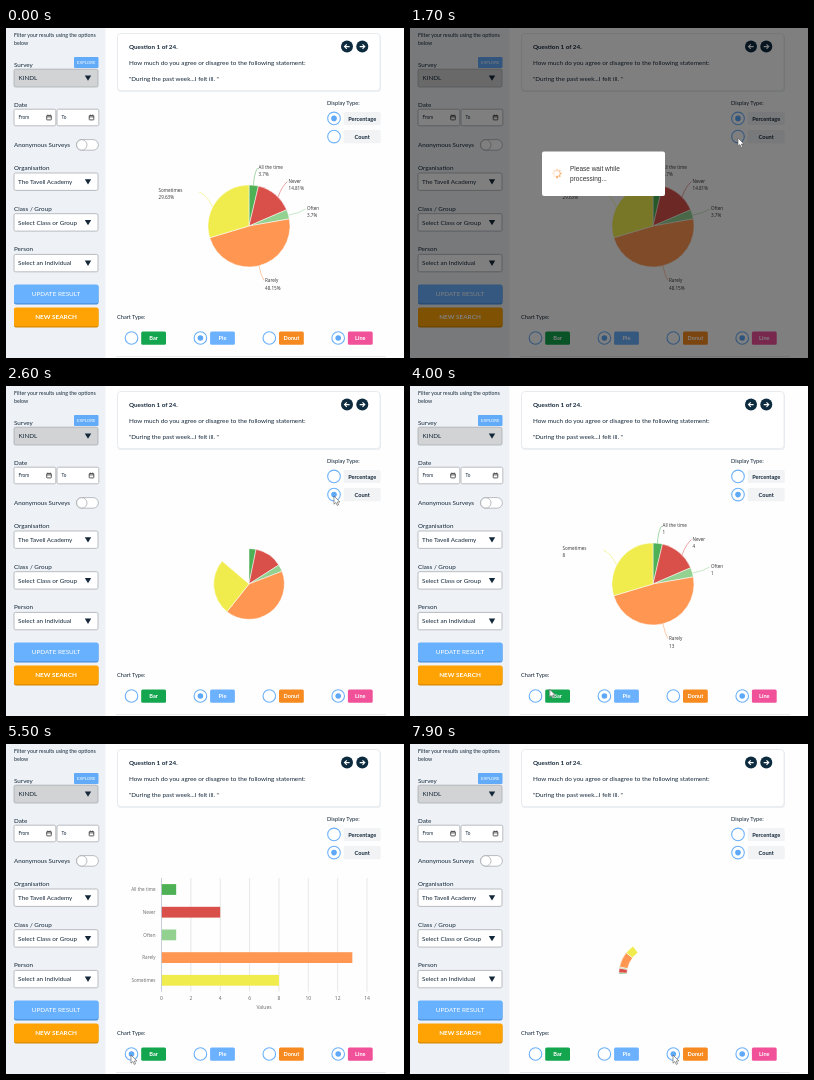
Animation of 398 by 330 pixels, one loop 8 s. Source, as an HTML page:

```html
<!DOCTYPE html>
<html lang="en">
<head>
<meta charset="utf-8">
<title>Survey results</title>
<style>
html, body { margin: 0; width: 100%; height: 100%; overflow: hidden; background: #fefefe; }
svg { display: block; width: 398px; height: 330px; font: 6.3px Lato, sans-serif; fill: #15283a; }
.b { font-weight: 700; }
.mid { text-anchor: middle; }
.end { text-anchor: end; }
.s { font-size: 5.65px; }
.white { fill: #fff; }
.field { fill: #fff; stroke: #a9adb2; stroke-width: .8; }
.ring { fill: #fff; stroke: #6bb0fa; stroke-width: 1.1; }
.dot { fill: #5fa8f8; }
.chart { font: 4.6px "Open Sans", sans-serif; fill: #333; }
.axis { fill: #666; }
.link { fill: none; stroke-width: .5; }
.grid { stroke: #d9d9d9; stroke-width: .6; }
#arcs { stroke: #fff; stroke-width: .5; }
.step { animation: 8s step-end infinite; }
#percent, #dotPercent { animation-name: first; }
#dotCount { animation-name: counted; }
#count { animation: countLabels 8s linear infinite; }
#bars, #dotBar { animation-name: bar; }
#dotPie { animation-name: pie; }
#dotDonut { animation-name: donut; }
#modal { animation-name: modal; }
#grow { transform-origin: 155.5px 0; animation: grow 8s linear infinite; }
#spin { animation: spin 1s steps(8) infinite; }
#cursor { animation: move 8s ease-in-out infinite; }
@keyframes first { 0% { opacity: 1 } 23.04%, 100% { opacity: 0 } }
@keyframes counted { 0% { opacity: 0 } 23.04%, 100% { opacity: 1 } }
@keyframes countLabels { 0%, 35.5% { opacity: 0 } 38%, 56.24% { opacity: 1 } 56.25%, 100% { opacity: 0 } }
@keyframes bar { 0% { opacity: 0 } 56.25% { opacity: 1 } 93.75%, 100% { opacity: 0 } }
@keyframes pie { 0% { opacity: 1 } 56.25%, 100% { opacity: 0 } }
@keyframes donut { 0% { opacity: 0 } 93.75%, 100% { opacity: 1 } }
@keyframes modal { 0% { opacity: 0 } 20.6% { opacity: 1 } 26.25%, 100% { opacity: 0 } }
@keyframes grow {
  0%, 56.25% { transform: scaleX(0); animation-timing-function: cubic-bezier(.37, 0, .63, 1) }
  68.75%, 100% { transform: none }
}
@keyframes spin { to { transform: rotate(360deg) } }
@keyframes move {
  0%, 6.24% { transform: translate(368px, 180px); opacity: 0 }
  6.25% { transform: translate(368px, 180px); opacity: 1 }
  11.25% { transform: translate(343px, 120px) }
  17.5%, 42.5% { transform: translate(328px, 110px) }
  50% { transform: translate(139.5px, 303px) }
  55%, 81.25% { transform: translate(125px, 311px) }
  90%, 100% { transform: translate(263px, 311px); opacity: 1 }
}
</style>
</head>
<body>
<svg viewBox="0 0 398 330">
  <defs>
    <path id="tri" d="M-3.2-2.6H3.2L0 2.8z"/>
    <g id="cal" fill="none" stroke="#333" stroke-width=".8">
      <rect x="-2.3" y="-2" width="4.6" height="4.4" rx=".5"/>
      <path d="M-2.3-.6H2.3M-1.2-2.9V-2M1.2-2.9V-2"/>
    </g>
    <path id="arrow" d="M-2.6 0H2.4M.2-2.2L2.5 0L.2 2.2" fill="none" stroke="#fff" stroke-width="1.1"/>
  </defs>

  <rect width="398" height="330" fill="#fefefe"/>
  <rect width="99.5" height="330" fill="#eef2f6"/>

  <g id="side">
    <text x="8" y="9" font-size="5.3">Filter your results using the options</text>
    <text x="8" y="17" font-size="5.3">below</text>
    <text x="8" y="39">Survey</text>
    <rect x="68" y="29" width="24.5" height="11" rx="1" fill="#62abf9"/>
    <text x="80.2" y="36.2" class="mid white" font-size="4.3">EXPLORE</text>
    <rect x="8" y="41.2" width="84" height="17.8" rx="1.5" class="field" style="fill:#d2d3d4"/>
    <text x="12.5" y="52.4">KINDL</text>
    <use href="#tri" x="82" y="50"/>
    <text x="8" y="79">Date</text>
    <rect x="8" y="81.2" width="41.8" height="16.6" rx="1.5" class="field"/>
    <rect x="51" y="81.2" width="41.8" height="16.6" rx="1.5" class="field"/>
    <text x="12.5" y="91.3" font-size="4.7">From</text>
    <text x="55.5" y="91.3" font-size="4.7">To</text>
    <use href="#cal" x="43" y="89.5"/>
    <use href="#cal" x="85.5" y="89.5"/>
    <text x="8" y="119">Anonymous Surveys</text>
    <rect x="70.4" y="111.6" width="22" height="10.6" rx="5.3" class="field"/>
    <circle cx="75.8" cy="116.9" r="5.2" class="field"/>
    <rect x="8" y="257" width="84.5" height="19.6" rx="2" fill="#4a90dc"/>
    <rect x="8" y="256.5" width="84.5" height="18.8" rx="2" fill="#68b1fe"/>
    <text x="50" y="268.4" class="mid white" font-size="6.4">UPDATE RESULT</text>
    <rect x="8" y="280" width="84.5" height="19.6" rx="2" fill="#d98700"/>
    <rect x="8" y="279.5" width="84.5" height="18.8" rx="2" fill="#ffa304"/>
    <text x="50" y="291.3" class="mid white b" font-size="6.4">NEW SEARCH</text>
  </g>

  <rect x="111.5" y="6.5" width="263.5" height="57.5" rx="3.5" fill="#eceff2"/>
  <rect x="111.5" y="5.5" width="262.5" height="57.2" rx="3.5" fill="#fff" stroke="#e3e7eb" stroke-width=".8"/>
  <text x="123" y="20.6" class="b">Question 1 of 24.</text>
  <text x="123" y="36.8" font-size="6.35">How much do you agree or disagree to the following statement:</text>
  <text x="123" y="53">"During the past week...I felt ill. "</text>
  <circle cx="341" cy="18.6" r="6" fill="#0d2b3e"/>
  <circle cx="356.3" cy="18.6" r="6" fill="#0d2b3e"/>
  <use href="#arrow" transform="translate(341 18.6) scale(-1 1)"/>
  <use href="#arrow" x="356.3" y="18.6"/>

  <text x="321" y="77" class="s">Display Type:</text>
  <text x="111" y="291.3" class="s">Chart Type:</text>
  <path d="M110 328.5H380" stroke="#e6e9ec"/>
  <g id="radios"></g>

  <g class="chart">
    <g id="arcs"></g>
    <g id="percent" class="step"></g>
    <g id="count"></g>
    <g id="bars" class="step">
      <g id="axes"></g>
      <g id="grow"></g>
      <path d="M155.5 134V247.5" stroke="#b9c4d6" stroke-width=".7"/>
    </g>
  </g>

  <g id="modal" class="step">
    <rect width="398" height="330" opacity=".5" fill="#000"/>
    <rect x="132" y="123.5" width="123" height="44.5" rx="2" fill="#fff"/>
    <g transform="translate(147 145.5)"><g id="spin"></g></g>
    <g font-family="Liberation Sans, Arial, sans-serif" font-size="6.5" fill="#333">
      <text x="160" y="143.3">Please wait while</text>
      <text x="160" y="153.2">processing...</text>
    </g>
  </g>

  <path id="cursor" d="M0 0V8.2L1.9 6.5L3.2 9.4L4.6 8.8L3.3 6H5.9z" fill="#fff" stroke="#555" stroke-width=".6"/>
</svg>
<script>
const $ = id => document.getElementById(id);
const add = (id, html) => $(id).insertAdjacentHTML('beforeend', html);

// name, value, colour, label x, label y, leader line
const answers = [
  ['All the time', 1, '#4fb155', 252.5, 141, 'M247.5 157Q248 146 251.5 140'],
  ['Never', 4, '#d9504b', 282.5, 154.8, 'M272 169Q276 158 281.5 153.5'],
  ['Often', 1, '#93d191', 301, 182, 'M283 187Q294 185 299.5 181'],
  ['Rarely', 13, '#ff9753', 259, 254.3, 'M253 238Q255 248 258 252.5'],
  ['Sometimes', 8, '#f0ec4e', 152.5, 164, 'M206.500 179Q201 167 193 164']
];
const total = answers.reduce((sum, a) => sum + a[1], 0);

// Sidebar selects
[['Organisation', 'The Tavell Academy', 145], ['Class / Group', 'Select Class or Group', 185.7],
 ['Person', 'Select an Individual', 226.4]].forEach(([label, value, y]) => add('side',
  `<text x="8" y="${y - 3}">${label}</text>
   <rect x="8" y="${y}" width="84" height="17.4" rx="1.500" class="field"/>
   <text x="12" y="${y + 10.9}">${value}</text><use href="#tri" x="82" y="${y + 8.8}"/>`));

// Radio buttons with their chips
function radio(name, x, y, w, fill, ink) {
  add('radios', `<circle cx="${x}" cy="${y}" r="6.3" class="ring"/>
    <circle id="dot${name}" cx="${x}" cy="${y}" r="2.8" class="dot step"/>
    <rect x="${x + 9.7}" y="${y - 6.5}" width="${w}" height="13.2" rx="1.500" fill="${fill}"/>
    <text x="${x + 9.7 + w / 2}" y="${y + 2.1}" class="b mid s" fill="${ink}">${name === 'Percent' ? 'Percentage' : name}</text>`);
}
radio('Percent', 328, 90.4, 37, '#f1f3f5', '#15283a');
radio('Count', 328, 108.6, 37, '#f1f3f5', '#15283a');
['Bar #14a64f', 'Pie #6bb1fe', 'Donut #f68a20', 'Line #f05199'].forEach((chip, i) => {
  const [name, fill] = chip.split(' ');
  radio(name, 125.5 + 68.9 * i, 310, 24.8, fill, '#fff');
});

// Pie labels and bar rows
answers.forEach(([name, value, fill, x, y, line], i) => {
  const share = +(value / total * 100).toFixed(2) + '%';
  for (const [id, text] of [['percent', share], ['count', value]])
    add(id, `<path class="link" d="${line}" stroke="${fill}"/>
      <text x="${x}" y="${y}">${name}</text><text x="${x}" y="${y + 7.2}">${text}</text>`);
  const row = 145.5 + 22.7 * i;
  add('axes', `<text x="149.500" y="${row + 1.6}" class="end axis">${name}</text>`);
  add('grow', `<rect x="155.500" y="${row - 5.4}" width="${value * 14.68}" height="10.8" fill="${fill}"/>`);
  add('arcs', `<path fill="${fill}"/>`);
});
for (let v = 0; v <= 14; v += 2) {
  const x = 155.5 + v * 14.68;
  add('axes', `<path class="grid" d="M${x} 134V247.500"/><text x="${x}" y="255.800" class="mid axis" font-size="5">${v}</text>`);
}
add('axes', '<text x="258" y="264.800" class="mid axis" font-size="5">Values</text>');

for (let i = 0; i < 8; i++)
  add('spin', `<path d="M0-2.6V-4.4" stroke="#f58220" stroke-width="1.500" opacity="${.15 + i * .12}" transform="rotate(${i * 45})"/>`);

const slices = [...$('arcs').children];
const ease = p => .5 - Math.cos(Math.PI * Math.min(1, Math.max(0, p))) / 2;

function drawArcs(cx, cy, outer, inner, start, sweep) {
  const at = (r, a) => `${cx + r * Math.sin(a)} ${cy - r * Math.cos(a)}`;
  let a = start;
  slices.forEach((slice, i) => {
    const b = a + sweep * answers[i][1] / total;
    slice.setAttribute('d', `M${at(outer, a)}A${outer} ${outer} 0 0 1 ${at(outer, b)}` +
      `L${at(inner, b)}A${inner} ${inner} 0 0 0 ${at(inner, a)}z`);
    a = b;
  });
}

const t0 = performance.now();
function render() {
  const t = (performance.now() - t0) % 8000;
  const donut = t >= 7530;
  const p = t < 1843 ? 1 : ease((t - (donut ? 7530 : 1843)) / 1000);
  $('arcs').style.display = t < 4500 || donut ? '' : 'none';
  if (donut) drawArcs(243, 230, 13 + 70 * p, 26, -Math.PI / 2, Math.PI * p);
  else drawArcs(243, 198, 41 * p, 0, 0, 2 * Math.PI * p);
  requestAnimationFrame(render);
}
render();
</script>
</body>
</html>
```
